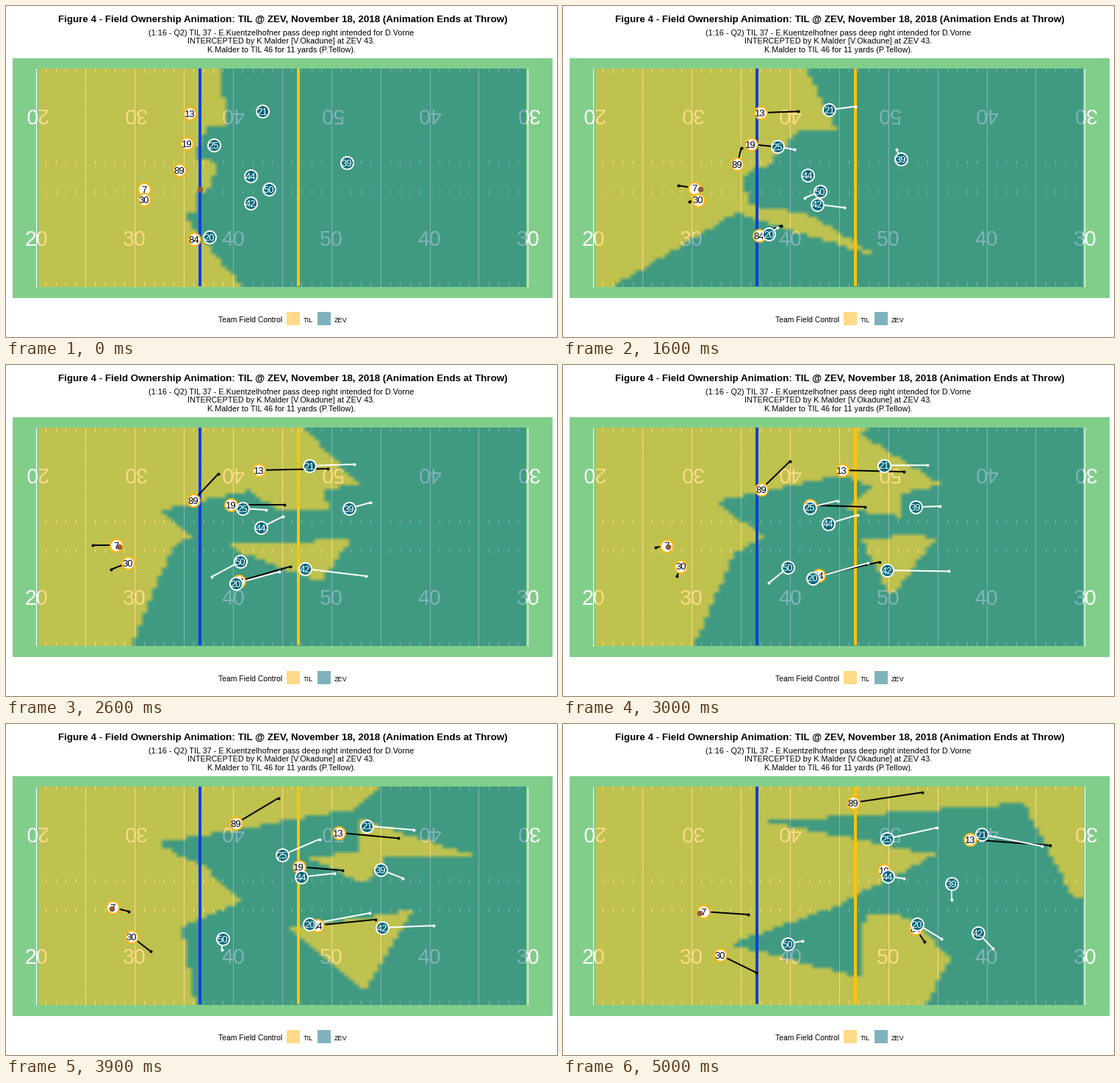
Write a matplotlib script that moves like this. It is 750x450 px and loops after 5.1 s.

```python
import numpy as np
import matplotlib.pyplot as plt
from matplotlib.animation import FuncAnimation
from matplotlib.patches import Rectangle

plt.rcParams["font.family"] = "Liberation Sans"
DPI, W, H = 96, 750, 450
PX = 72 / DPI                  # points per pixel
FRAMES, STEP = 51, 100
SNAP, MID, END = 9, 26, 50     # frames of the players' poses
CATCH = 16                     # frame at which the snap arrives

GREEN, GOLD, TEAL = "#81ce8b", "#ffb612", "#006778"
TOP, BOTTOM, LEFT, RIGHT = 85, 382, 45, 708
X20, YARD = 41, 13.388
YARDS = np.array([YARD, (BOTTOM - TOP) / 53.3])   # pixels per yard in x, y

fig = plt.figure(figsize=(W / DPI, H / DPI), dpi=DPI, facecolor="white")
ax = fig.add_axes([0, 0, 1, 1])
ax.axis("off")


def box(x, y, w, h, color):
    ax.add_patch(Rectangle((x, y), w, h, fc=color, ec="none", zorder=0))


def line(xs, ys, color, width, z):
    return ax.plot(xs, ys, color=color, lw=width * PX, zorder=z,
                   solid_capstyle="butt")[0]


def dot(size, z, fill, edge="none", edge_width=0):
    return ax.plot([], [], "o", ms=size * PX, mfc=fill, mec=edge,
                   mew=edge_width * PX, zorder=z)[0]


def label(x, y, s, size, color="black", ha="center", z=1, **kw):
    return ax.text(x, y, s, fontsize=size, color=color, ha=ha,
                   va="baseline", zorder=z, **kw)


def draw_titles():
    label(376.5, 22, "Figure 4 - Field Ownership Animation: TIL @ ZEV, "
          "November 18, 2018 (Animation Ends at Throw)", 10, weight="bold")
    notes = ["(1:16 - Q2) TIL 37 - E.Kuentzelhofner pass deep right "
             "intended for D.Vorne",
             "INTERCEPTED by K.Malder [V.Okadune] at ZEV 43.",
             "K.Malder to TIL 46 for 11 yards (P.Tellow)."]
    for i, note in enumerate(notes):
        label(375, 40 + 11.4 * i, note, 8.2)


def draw_field():
    box(9, 71, 735, 326, GREEN)
    for yard in range(51):
        x = X20 + yard * YARD
        if yard % 5 == 0:
            line([x, x], [TOP, BOTTOM], "white", 1, 1)
        else:
            for y in (TOP, 210, 249.5, 375.5):
                line([x, x], [y, y + 5], "white", 1, 1)
        if yard % 10 == 0:
            mark = 50 - abs(yard - 30)
            label(x, 326, mark, 21.4, "white")
            label(x, 139, mark, 21.4, "white", rotation=180,
                  rotation_mode="anchor")
    line([264, 264], [TOP, 381], "#0f40d8", 4, 3)
    line([398, 398], [TOP, 381], "#f9c40f", 4, 3)


def draw_legend():
    label(289, 430, "Team Field Control", 7.8, ha="left")
    for x, name, color in ((382, "TIL", "#ffda88"), (424, "ZEV", "#7fb3bb")):
        box(x, 416, 17.5, 17.5, color)
        label(x + 23, 430, name, 6.8, ha="left")


class Player:
    """Stands at start until the snap, then runs a spline through two
    poses (x, y, vx, vy) in pixels and pixels per second."""

    def __init__(self, num, offense, start, mid, end):
        self.offense = offense
        self.poses = np.array([start + (0, 0), mid, end], float)
        ink = "black" if offense else "white"
        z = 6 if offense else 7
        self.arrow = line([], [], ink, 2, 4)
        self.tip = dot(4, 4, ink)
        self.disc = (dot(17, z, "white", GOLD, 2) if offense
                     else dot(17, z, TEAL, "white", 2))
        self.num = label(0, 0, num, 9.8, ink, z=z + .1)

    def at(self, frame):
        """Position and velocity."""
        i = int(frame >= MID)
        t0, t1 = ((SNAP, MID), (MID, END))[i]
        d = (t1 - t0) * STEP / 1000
        u = max(0, (frame - t0) / (t1 - t0))
        (p, a), (q, b) = (np.split(pose, 2) for pose in self.poses[i:i + 2])
        c2 = 3 * (q - p) - (2 * a + b) * d
        c3 = 2 * (p - q) + (a + b) * d
        return (p + a * d * u + c2 * u**2 + c3 * u**3,
                a + (2 * c2 * u + 3 * c3 * u**2) / d)

    def draw(self, frame):
        (x, y), (vx, vy) = self.at(frame)
        self.arrow.set_data([x, x + vx], [y, y + vy])
        self.tip.set_data([x + vx], [y + vy])
        self.disc.set_data([x], [y])
        self.num.set_position((x, y + 4.8))


draw_titles()
draw_field()
draw_legend()

passer = Player(7, True, (188, 249), (150, 245, -32, 0), (191, 255, 61, 4))
players = [
    passer,
    Player(13, True, (250, 146), (344, 143, 94, -2), (554, 157, 109, 8)),
    Player(19, True, (246, 187), (306, 190, 73, 0), (437, 199, 3, 3)),
    Player(89, True, (236, 223), (255, 184, 34, -36), (395, 107, 94, -14)),
    Player(30, True, (188, 263), (166, 269, -23, 9), (214, 314, 49, 24)),
    Player(84, True, (256, 317), (317, 294, 70, -20), (480, 278, 12, 18)),
    Player(21, False, (349, 143), (413, 137, 61, -2), (570, 150, 82, 16)),
    Player(25, False, (283, 189), (322, 195, 32, 2), (441, 156, 68, -15)),
    Player(39, False, (464, 213), (467, 195, 29, -8), (529, 217, 0, 22)),
    Player(44, False, (333, 231), (347, 221, 30, -15), (442, 207, 22, 3)),
    Player(50, False, (358, 249), (319, 267, -39, 21), (306, 299, 20, -4)),
    Player(42, False, (333, 268), (407, 277, 83, 10), (565, 284, 20, 21)),
    Player(20, False, (277, 314), (313, 297, 59, -16), (482, 272, 33, 20)),
]
ball = dot(6.5, 9, "#9c5a3c", "#6e5348", 1)

COLS, ROWS = 99, 53
GRID = np.stack(np.meshgrid(
    LEFT + (np.arange(COLS) + .5) * (RIGHT - LEFT) / COLS,
    TOP + (np.arange(ROWS) + .5) * (BOTTOM - TOP) / ROWS), -1)
TINTS = np.array([[0, 0x67, 0x78, 127.5], [255, 0xb6, 0x12, 127.5]]) / 255
overlay = ax.imshow(np.zeros((ROWS, COLS, 4)), interpolation="bilinear",
                    extent=(LEFT, RIGHT, BOTTOM, TOP), aspect="auto",
                    zorder=2)
ax.set_xlim(0, W)
ax.set_ylim(H, 0)


def nearest(offense, frame):
    """Yards from each cell to where the team's closest man will be."""
    spots = [sum(p.at(frame)) for p in players if p.offense == offense]
    return np.min([np.hypot(*np.moveaxis((GRID - s) / YARDS, -1, 0))
                   for s in spots], axis=0)


def ball_at(frame):
    """Snapped to the passer, then carried from his right to his left."""
    hand = passer.at(frame)[0]
    hand = hand + [np.interp(frame, [CATCH, END], [8, -5]), 1.5]
    flight = np.clip((frame - SNAP) / (CATCH - SNAP), 0, 1)
    return (1 - flight) * np.array([264, 249]) + flight * hand


def update(frame):
    owned = nearest(True, frame) < nearest(False, frame)
    overlay.set_data(TINTS[owned.astype(int)])
    for p in players:
        p.draw(frame)
    x, y = ball_at(frame)
    ball.set_data([x], [y])
    return []


anim = FuncAnimation(fig, update, frames=FRAMES, interval=STEP, repeat=True,
                     init_func=lambda: update(0))
plt.show()
```
